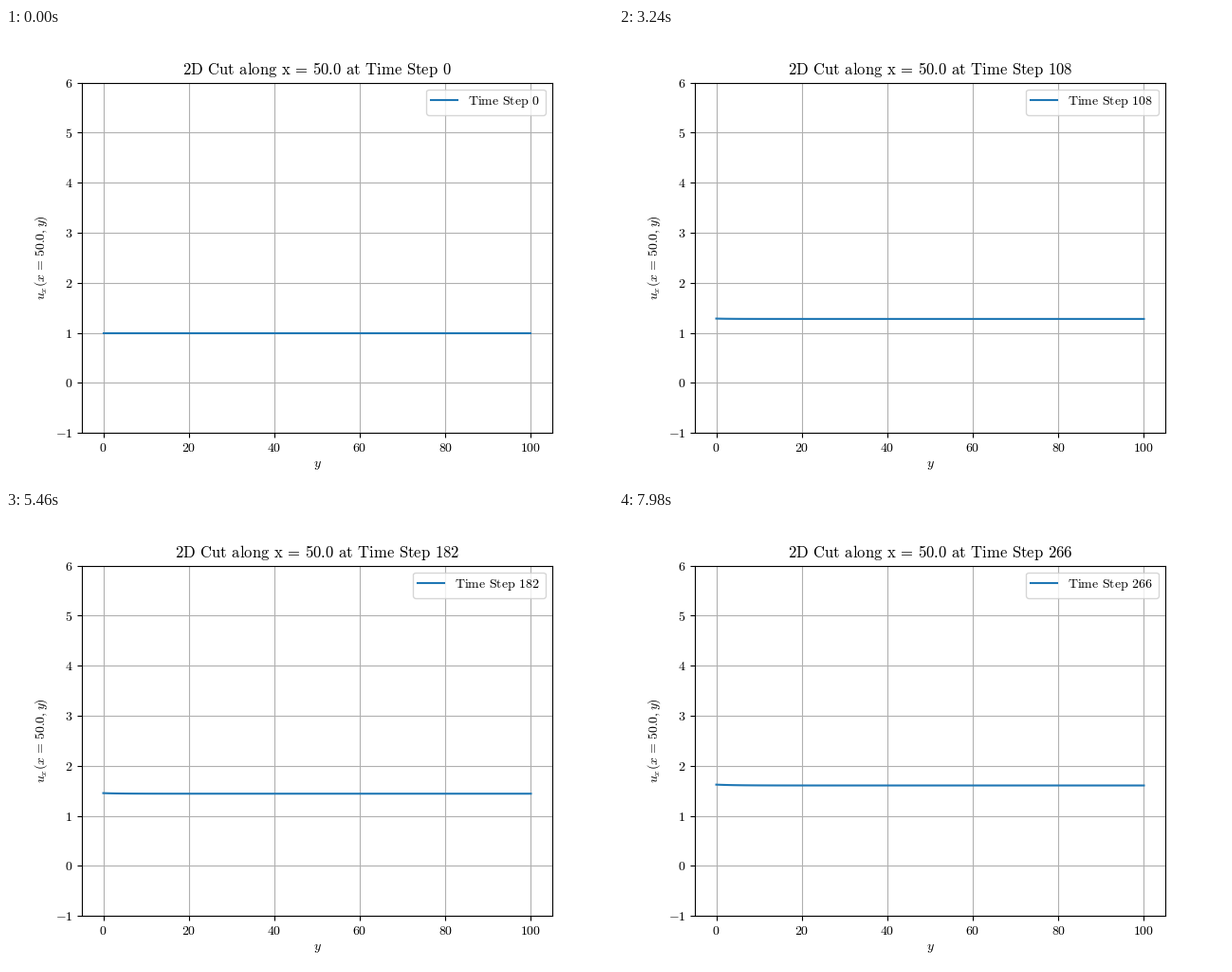
A matplotlib script for the animation above (8 s loop, 640 px wide and 480 px high).

```python
import numpy as np
import matplotlib.pyplot as plt
from matplotlib.animation import FuncAnimation

LOOP_MS = 8000
TICK_MS = 20
STEP_MS = 30
LAST_STEP = 266

plt.rcParams.update({
    "font.family": "Liberation Serif",
    "mathtext.fontset": "cm",
    "font.size": 10,
})


def roman(text):
    """Set plain text in upright Computer Modern with text-mode spacing."""
    text = text.replace(" = ", r"\hspace{0.18}=\hspace{0.18}")
    text = text.replace(" ", r"\hspace{0.38}")
    return rf"$\mathrm{{{text}}}$"


def profile(step):
    """Velocity relaxing upwards, with a thin layer growing at y = 0."""
    core = 1 + 1.74 * (1 - np.exp(-step / 620))
    age = step / LAST_STEP
    depth = 0.5 + 4 * np.sqrt(age)
    return core + 0.017 * age * np.exp(-y / depth)


y = np.linspace(0, 100, 101)

fig, ax = plt.subplots(figsize=(6.4, 4.8), dpi=100)
line, = ax.plot(y, profile(0), color="#1f77b4", lw=1.5, label=roman("Time Step 0"))
ax.set_xlim(-5, 105)
ax.set_ylim(-1, 6)
ax.set_xticks(range(0, 101, 20))
ax.set_yticks(range(-1, 7))
for axis in (ax.xaxis, ax.yaxis):
    axis.set_major_formatter(lambda v, pos: roman(f"{v:.0f}"))
ax.set_xlabel("$y$")
ax.set_ylabel(r"$u_x(x\hspace{0.116}=\hspace{0.116}\mathrm{50.0},y)$")
ax.grid(True)
title = ax.set_title(roman("2D Cut along x = 50.0 at Time Step 0"), fontsize=12)
label = ax.legend(loc="upper right").get_texts()[0]


def draw(tick):
    step = min((tick * TICK_MS + STEP_MS - TICK_MS) // STEP_MS, LAST_STEP)
    line.set_ydata(profile(step))
    title.set_text(roman(f"2D Cut along x = 50.0 at Time Step {step}"))
    label.set_text(roman(f"Time Step {step}"))
    return line, title, label


anim = FuncAnimation(fig, draw, frames=LOOP_MS // TICK_MS, interval=TICK_MS,
                     repeat=True, repeat_delay=0, blit=False)
plt.show()
```
